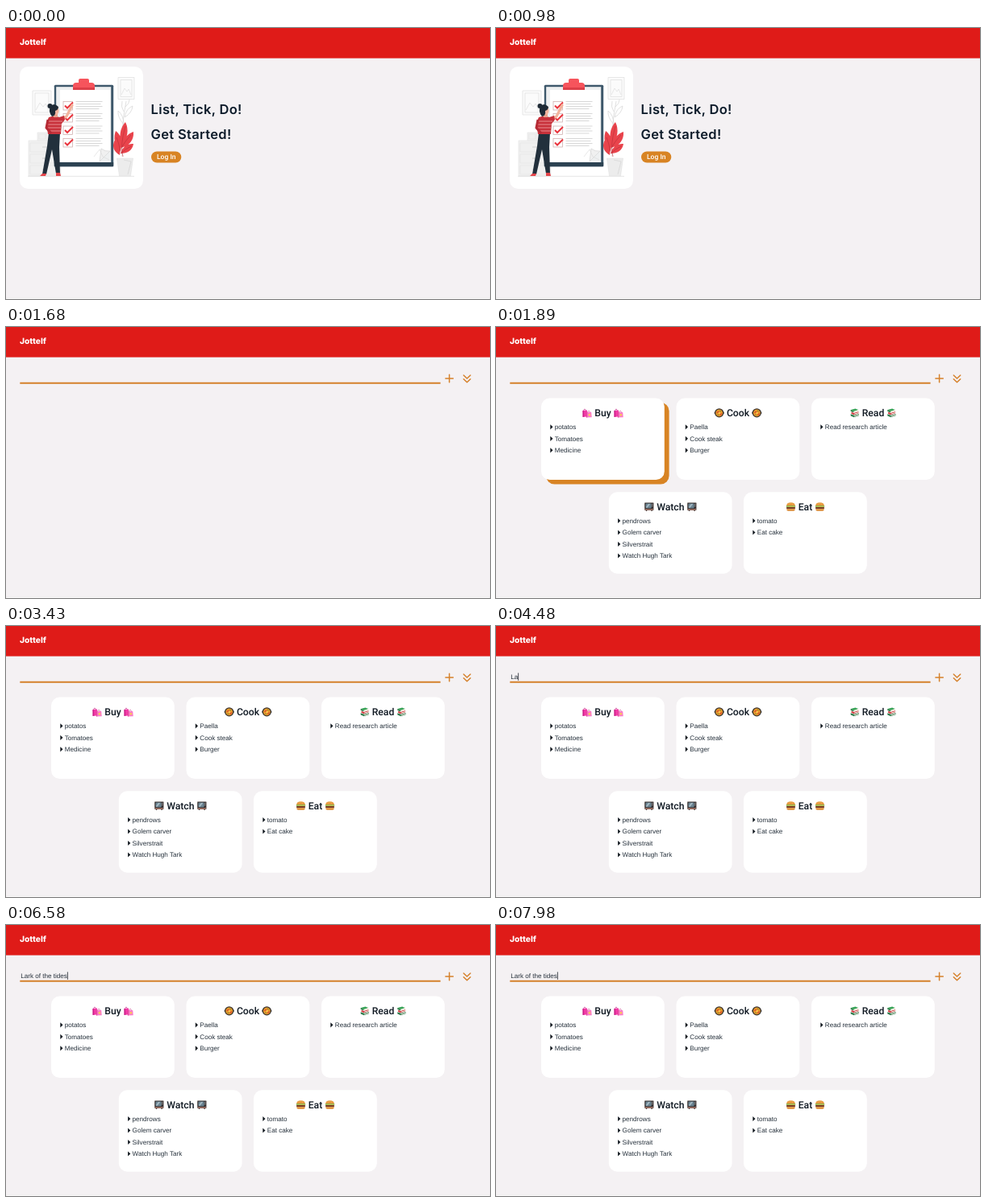
These frames come from a looping animation (600 by 337 pixels, 8 s). An HTML page:

```html
<!DOCTYPE html>
<html lang="en">
<head>
<meta charset="utf-8">
<title>Jottelf</title>
<style>
  html, body { margin: 0; width: 100%; height: 100%; overflow: hidden; background: #f4f1f3; }
  svg.stage { display: block; width: 100%; height: 100%; }
  text { text-rendering: geometricPrecision; white-space: pre; }
  .brand { font: 800 10.2px Inter, sans-serif; fill: #fff; }
  .hero { font: 600 16.5px Inter, sans-serif; letter-spacing: .33px; fill: #0d1b2a; }
  .button { font: 500 8.5px Roboto, sans-serif; fill: #fff; }
  .title { font: 500 12.2px Roboto, sans-serif; fill: #0f1822; text-anchor: middle; }
  .item { font: 8.1px "Liberation Sans", Arial, sans-serif; fill: #25303b; }
  .accent { fill: none; stroke: #d5812b; stroke-width: 1.5; stroke-linecap: round; stroke-linejoin: round; }

  /* Hard scene changes on one 8 s loop */
  .landing, .app, .bare, .tools, .cards, .shadow { animation: 8s step-end infinite; }
  .landing { animation-name: landing; }
  .app { animation-name: app; }
  .bare { animation-name: bare; }
  .tools { animation-name: tools; }
  .cards { animation-name: cards; }
  .shadow { animation-name: shadow; }
  @keyframes landing { 0% { opacity: 1 } 20.125%, 100% { opacity: 0 } }
  @keyframes app { 0% { opacity: 0 } 20.125%, 100% { opacity: 1 } }
  @keyframes bare { 0% { opacity: 1 } 21%, 100% { opacity: 0 } }
  @keyframes tools { 0% { opacity: 0 } 21%, 100% { opacity: 1 } }
  @keyframes cards { 0% { opacity: 0 } 21.875%, 100% { opacity: 1 } }
  @keyframes shadow { 0% { opacity: 0 } 22.75% { opacity: 1 } 27.125%, 100% { opacity: 0 } }
</style>
</head>
<body>
<svg class="stage" viewBox="0 0 600 337" xmlns="http://www.w3.org/2000/svg">
  <defs>
    <g id="bags">
      <path d="M1.7 4V2.4q1.2-2.6 2.4 0V4" fill="none" stroke="#c22a86" stroke-width=".7"/>
      <path d="M.5 3.2l5.5-.5.8 7.8-6.2.6z" fill="#f23aa6"/>
      <path d="M.5 3.2l1.4.2.3 7.6-1.6.1z" fill="#c9218a"/>
      <path d="M6.8 6V4.6q1.4-2.4 2.6 0V6" fill="none" stroke="#d0569c" stroke-width=".7"/>
      <path d="M5 5l6.2.3.5 6.1-6.8.3z" fill="#fb7cc8"/>
      <path d="M5 5l1.3.3-.2 6.4H4.9z" fill="#e2499f"/>
      <circle cx="8.9" cy="8.4" r="1.2" fill="#fbd04f"/>
    </g>
    <g id="pan">
      <path d="M0 6h1.4M10.6 6H12" stroke="#3a3430" stroke-width="2"/>
      <circle cx="6" cy="6" r="5.6" fill="#35302c"/>
      <circle cx="6" cy="6" r="4.4" fill="#e89a2c"/>
      <path d="M3.2 6.2q1-2.4 2.6-1.2M6.8 8.6q2.2-.4 2-2.2" fill="none" stroke="#d9432c" stroke-width="1.1"/>
      <path d="M6.6 3.2l1.6 1M4 8.2l1.4.7" stroke="#5b8b31" stroke-width="1"/>
      <circle cx="6.3" cy="6.2" r=".9" fill="#ffd964"/>
    </g>
    <g id="books">
      <path d="M1 2.2L6.8.6l3.8 1.7-5.8 1.8z" fill="#37a457"/>
      <path d="M1 2.2l3.8 1.9v1.7L1 4z" fill="#1d7038"/>
      <path d="M4.8 4.1l5.8-1.8v1.6L4.8 5.8z" fill="#eee6d8"/>
      <path d="M1.8 4.9l3 1.2 6-1.7v2.1L4.9 8.4 1.8 7z" fill="#cf3138"/>
      <path d="M5.2 6.9l5.7-1.6v.9L5.2 7.9z" fill="#f0e8dc"/>
      <path d="M1 7.4l4 1.5 6.2-1.8v2.3L5 11.5l-4-1.7z" fill="#2c7b4c"/>
      <path d="M5.2 9.7l5.9-1.7v1l-5.9 1.7z" fill="#eee6d8"/>
    </g>
    <g id="tv">
      <rect x=".2" y=".8" width="11.6" height="9.8" rx="1" fill="#77706d"/>
      <rect x=".9" y="1.5" width="10.2" height="7" rx=".7" fill="#332f31"/>
      <rect x="1.6" y="2.1" width="7.3" height="5.7" rx="1.2" fill="#6b8492"/>
      <path d="M2 6.8l3-4.2h2.4L3.6 7.4z" fill="#a5bac4"/>
      <circle cx="10" cy="3.2" r=".6" fill="#c9c2bd"/>
      <circle cx="10" cy="5.1" r=".6" fill="#c9c2bd"/>
      <path d="M1 9.5h10" stroke="#b65b42" stroke-width=".8"/>
      <path d="M2 10.6h1.4v.9H2zM8.6 10.6H10v.9H8.6z" fill="#3c3534"/>
    </g>
    <g id="burger">
      <path d="M.5 5Q.7.7 6 .7T11.5 5z" fill="#e6983b"/>
      <path d="M3.4 2.6h.6M5.7 1.8h.6M8 2.7h.6" stroke="#fbe0a4" stroke-width=".6"/>
      <rect x=".2" y="4.8" width="11.6" height="1.4" rx=".7" fill="#71ab3b"/>
      <path d="M.8 6h10.4L8.5 7.3z" fill="#f7c83c"/>
      <rect x=".4" y="6.5" width="11.2" height="2" rx="1" fill="#743a22"/>
      <path d="M.7 8.7h10.6q0 2.6-2 2.6H2.7q-2 0-2-2.6z" fill="#dc8a31"/>
    </g>
  </defs>

  <rect width="600" height="337" fill="#f4f1f3"/>
  <rect width="600" height="37.6" fill="#df1b18"/>
  <text class="brand" x="17" y="21.3">Jottelf</text>
  <path d="M0 337q0-1.6 2-1.6h596q2 0 2 1.6z" fill="#fff" stroke="#e3dfe1" stroke-width=".4"/>

  <g class="landing">
    <rect x="17" y="48" width="153" height="152" rx="10.5" fill="#fff"/>
    <g fill="#fbfbfb" stroke="#dfdfdf" stroke-width=".7">
      <path d="M33 78h23v30H33zM36 81h17v24H36zM139 61.5h20v27h-20zM142 64.5h14v21h-14z"/>
      <path d="M37 102l5-9 4 5 3-4 4 8M143 83l4-8 3 4 2-3 3 7" fill="none"/>
    </g>
    <g fill="#f0f0f0" stroke="#e2e2e2" stroke-width=".6">
      <path d="M28 140h40v44H28zM30 143h36v11H30zM30 157h36v11H30zM30 171h36v11H30z"/>
      <path d="M39 130h12v10H39zM41 132h8v6h-8z"/>
    </g>
    <path d="M45 148h6M45 162h6M45 176h6" stroke="#cfcfcf"/>
    <path d="M27 184.4h132" stroke="#d6d6d6" stroke-width=".6"/>
    <g fill="none" stroke="#d9d9d9" stroke-width=".8">
      <path d="M144 160Q142 125 149 91M146 120q-8-9-7-17 7 6 7 17M147 111q9-5 10-14-8 3-10 14M146 104q-4-6-2-13M148 98q5-4 5-9"/>
    </g>

    <rect x="59.8" y="70.8" width="73.4" height="101.4" rx="1.5" fill="#3e586b"/>
    <path d="M59.8 167h73.4v5.2H59.8z" fill="#2c4252"/>
    <rect x="62.2" y="73.2" width="68" height="93.8" fill="#eef0f1"/>
    <path d="M67 77h62v76l-13 13H67z" fill="#fff"/>
    <path d="M116 166l2-16q5 4 11 3z" fill="#f0f0f0" stroke="#cfcfcf" stroke-width=".6"/>
    <path d="M109 160l7-9 4 9 8 4" fill="none" stroke="#d8d8d8" stroke-width=".6"/>
    <path d="M83 77v-5q0-4 4-4h3v-3q0-2 2-2h9q2 0 2 2v3h3q4 0 4 4v5z" fill="#f6545c"/>
    <path d="M83 74h27v3H83z" fill="#dc3f48"/>
    <g id="checks"></g>

    <g fill="#e9444c">
      <path d="M141 158q-12-7-6-19 8 4 6 19zM142 153q-11-12-6-25 10 7 6 25zM143 148q-5-20 5-31 7 14-5 31zM143 149q3-16 15-20 1 15-15 20zM142 156q4-13 16-12-2 12-16 12z"/>
    </g>
    <path d="M145 160q-4-14 3-38M143 149q5-9 12-16M142 156q7-6 13-9M142 154q-2-11-5-18" fill="none" stroke="#b52f39" stroke-width=".6"/>
    <path d="M137.5 162h20l-3 22h-14z" fill="#ececec" stroke="#dcdcdc" stroke-width=".5"/>
    <path d="M146 164l9 2-4 16" fill="none" stroke="#d5d5d5" stroke-width=".7"/>

    <path d="M53 130h14l-1 18 1 33h-5l-5-30-7 31h-5l6-35z" fill="#22303c"/>
    <path d="M45 181h5l-1 3h-7zM62 180h5l1 4h-6z" fill="#e24349"/>
    <path d="M67 114l8-4 7-14" fill="none" stroke="#f3b39d" stroke-width="3.2" stroke-linecap="round" stroke-linejoin="round"/>
    <path d="M53 111q8-3 13 0l6-2 1 5-4 5-1 13H52l-2-14z" fill="#c8323b"/>
    <path d="M52 116h18M51 120h18M52 124h16M52 128h16" stroke="#f0a5a6" stroke-width=".8"/>
    <path d="M52 114l-2 10 6 7" fill="none" stroke="#b52b35" stroke-width="3" stroke-linejoin="round"/>
    <path d="M58 105h6v6h-5z" fill="#e9a28d"/>
    <ellipse cx="61.5" cy="103" rx="4" ry="5" fill="#f3b39d"/>
    <path d="M65 98q-6-6-10 0-3 6 2 12 5-1 4-7 4-1 4-5z" fill="#1e2a35"/>
    <circle cx="54.5" cy="97" r="3" fill="#1e2a35"/>

    <text class="hero" x="179.6" y="107">List, Tick, Do!</text>
    <text class="hero" x="179.6" y="138">Get Started!</text>
    <rect x="180" y="153.4" width="37.3" height="14.2" rx="7.1" fill="#d88424"/>
    <text class="button" x="187" y="163.4">Log In</text>
  </g>

  <g class="app">
    <path class="bare" d="M17.3 69.8H543.6" stroke="#d5812b" stroke-width="2"/>
    <g class="tools">
      <path d="M17.3 69.8H538.6" stroke="#d5812b" stroke-width="2"/>
      <path class="accent" d="M544.9 64h9.4M549.6 59.3v9.4M567.3 60l4.2 4 4.2-4M567.3 64.8l4.2 4 4.2-4"/>
    </g>
    <rect class="shadow" x="62" y="94" width="152.6" height="101.5" rx="10.5" fill="#d88424"/>
    <g class="cards" id="cards"></g>
    <text class="item" id="entry" x="18.2" y="65.9"></text>
    <rect id="caret" y="58.4" width=".8" height="9.4" fill="#1b2129"/>
  </g>
</svg>
<script>
  const $ = id => document.getElementById(id);

  // Clipboard rows: box, tick and three grey lines
  $("checks").innerHTML = [96.5, 111.5, 127, 142.5].map(y => `
    <rect x="71" y="${y - 5}" width="11.5" height="10.5" fill="#fff" stroke="#c9a5a5" stroke-width=".7"/>
    <path d="M73 ${y}l3 3 7-7" fill="none" stroke="#e9333c" stroke-width="2"/>
    <path d="M86.5 ${y - 5}h33M86.5 ${y - 2}h31M86.5 ${y + 1}h33M86.5 ${y + 4}h29"
      stroke="#cdcdcd" stroke-width=".8"/>`).join("");

  // x, y, title, icon, icon reach from the centre, items
  const lists = [
    [56, 88.6, "Buy", "bags", 25.5, ["potatos", "Tomatoes", "Medicine"]],
    [223.5, 88.6, "Cook", "pan", 29.3, ["Paella", "Cook steak", "Burger"]],
    [391, 88.6, "Read", "books", 28.8, ["Read research article"]],
    [139.8, 205.3, "Watch", "tv", 32.5, ["pendrows", "Golem carver", "Silverstrait", "Watch Hugh Tark"]],
    [307, 205.3, "Eat", "burger", 24, ["tomato", "Eat cake"]]
  ];

  const row = (x, y, label) => `
    <path d="M${x + 11.3} ${y - 6}l3.2 3.1-3.2 3.1z" fill="#10171e"/>
    <text class="item" x="${x + 16.8}" y="${y}">${label}</text>`;

  const card = ([x, y, title, icon, reach, items]) => {
    const mid = x + 76.5, top = y + 12.2;
    return `<rect x="${x}" y="${y}" width="152.8" height="101.4" rx="10.5" fill="#fff"/>
      <use href="#${icon}" x="${mid - reach}" y="${top}"/>
      <text class="title" x="${mid}" y="${y + 22.4}">${title}</text>
      <use href="#${icon}" x="${mid + reach - 12}" y="${top}"/>` +
      items.map((label, i) => row(x, y + 38.6 + i * 14.5, label)).join("");
  };
  $("cards").innerHTML = lists.map(card).join("");

  // Typing and caret
  const phrase = "Lark of the tides";
  const keys = [4340, 4480, 4620, 4830, 5040, 5110, 5180, 5320, 5460,
    5600, 5670, 5880, 6090, 6230, 6230, 6300, 6580];
  const blinks = [2590, 3150, 3640, 4130, 4340, 7070, 7630];
  const entry = $("entry"), caret = $("caret"), start = performance.now();
  const passed = (times, t) => times.filter(at => at <= t).length;

  function draw() {
    const t = (performance.now() - start) % 8000;
    const typed = phrase.slice(0, passed(keys, t));
    if (entry.textContent !== typed) entry.textContent = typed;
    caret.setAttribute("x", 18.3 + (typed ? entry.getComputedTextLength() : 0));
    caret.style.opacity = passed(blinks, t) % 2;
    requestAnimationFrame(draw);
  }
  draw();
</script>
</body>
</html>
```
